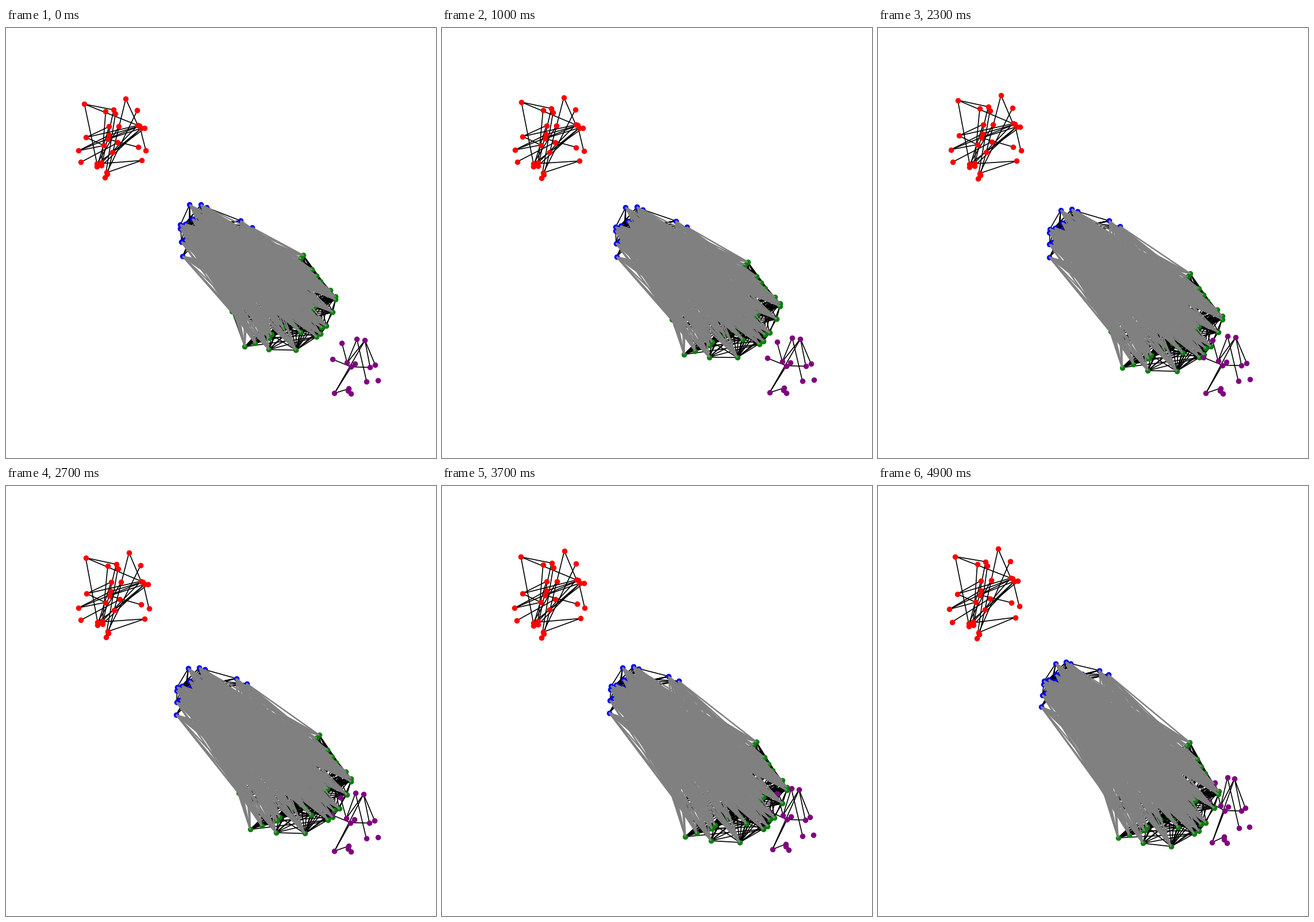
A matplotlib script for the animation above (5 s loop, 748 px wide and 748 px high).

```python
import numpy as np
import matplotlib.pyplot as plt
from itertools import combinations, pairwise, product
from matplotlib.animation import FuncAnimation
from matplotlib.collections import LineCollection

SIZE, DPI, FRAMES, INTERVAL = 748, 100, 50, 100
MID, END = 2.3, 4.9
rng = np.random.default_rng(11)


class Cluster:
    """Nodes carried by one affine drift, fitted to a few anchor nodes.

    anchors maps a node to its x, y at MID and at END; inner adds random
    nodes inside the rim; sway is the size of the shared vertical swing.
    """

    def __init__(self, color, nodes, anchors, sway=0.0, inner=0):
        start = np.array(nodes, float)
        keys = start[list(anchors)]
        shift = np.array(list(anchors.values())) - np.tile(keys, 2)
        if inner:
            mix = rng.dirichlet(np.full(len(start), 0.35), inner)
            start = np.vstack([start, mix @ start])
        fit = np.linalg.lstsq(self.basis(keys), shift, rcond=None)[0]
        drift = self.basis(start) @ fit
        self.color, self.start, self.sway = color, start, sway
        self.mid, self.end = start + drift[:, :2], start + drift[:, 2:]

    @staticmethod
    def basis(points):
        return np.column_stack([np.ones(len(points)), points])

    def __len__(self):
        return len(self.start)

    def at(self, t):
        path = (self.start * (t - MID) * (t - END) / (MID * END)
                + self.mid * t * (t - END) / (MID * (MID - END))
                + self.end * t * (t - MID) / (END * (END - MID)))
        return path - [0, self.sway * t * (t - MID) * (t - END)]


def sample(pairs, chance):
    return [p for p in pairs if rng.random() < chance]


red = Cluster(
    "red",
    [(136, 132), (208, 123), (187, 142), (173, 145), (190, 149), (228, 143),
     (179, 171), (196, 171), (229, 169), (232, 170), (235, 174), (241, 174),
     (139, 190), (179, 186), (177, 193), (194, 199), (170, 204), (126, 213),
     (185, 216), (230, 207), (243, 213), (130, 233), (236, 230), (158, 236),
     (166, 234), (158, 241), (166, 239), (175, 251), (176, 254), (172, 260)],
    {0: (138, 125, 133, 124), 11: (248, 171, 243, 164), 17: (126, 212, 126, 211),
     22: (239, 232, 239, 228), 29: (174, 261, 170, 267)})

blue = Cluster(
    "blue",
    [(319, 307), (339, 307), (349, 312), (408, 335), (428, 347), (324, 332),
     (303, 342), (303, 349), (305, 372), (307, 397), (316, 346), (311, 368)],
    {0: (318, 311, 310, 299), 3: (402, 336, 384, 322),
     6: (298, 357, 287, 352), 9: (298, 395, 284, 378)},
    sway=0.25, inner=20)

green = Cluster(
    "green",
    [(517, 395), (513, 400), (532, 420), (540, 431), (547, 441), (564, 456),
     (573, 467), (573, 472), (568, 494), (557, 518), (549, 521), (547, 532),
     (540, 537), (512, 529), (504, 560), (457, 559), (457, 539), (433, 548),
     (415, 554), (400, 503), (393, 493)],
    {0: (545, 423, 548, 442), 8: (589, 532, 577, 562), 14: (520, 597, 513, 629),
     18: (427, 584, 423, 603), 20: (401, 534, 393, 550)},
    sway=0.85, inner=22)

purple = Cluster(
    "purple",
    [(584, 548), (610, 541), (624, 543), (568, 576), (593, 582), (607, 584),
     (600, 589), (633, 590), (642, 586), (627, 615), (647, 613), (571, 635),
     (596, 627), (595, 631), (600, 636)],
    {0: (583, 544, 590, 516), 2: (621, 537, 616, 509), 3: (565, 572, 572, 548),
     10: (647, 611, 647, 592), 11: (570, 635, 580, 620)},
    sway=0.5)

clusters = [red, blue, green, purple]

# Top red nodes reach the bottom knot, left ones the knot on the right.
red_edges = [(i, 23 + 5 * i % 7) for i in range(8)]
red_edges += [(i, 8 + i % 4) for i in (12, 13, 14, 17, 18, 23, 24, 26)]
red_edges += [*pairwise((2, 0, 8, 1)), *pairwise((6, 12, 16, 17, 13)),
              *pairwise((23, 22, 27)), (9, 20), (14, 19), (15, 21)]
purple_edges = [*pairwise((0, 4, 1, 9)), *pairwise((3, 6, 7, 2, 4)),
                *pairwise((8, 2, 11, 6)), (11, 12)]
edges = [np.array(e) for e in (
    red_edges,
    sample(combinations(range(len(blue)), 2), 0.2),
    sample(combinations(range(len(green)), 2), 0.25),
    purple_edges)]


def inside_waist(pair):
    """True if the bridge passes on the inner side of the left green corner."""
    origin = blue.start[pair[0]]
    corner, tip = green.start[20] - origin, green.start[pair[1]] - origin
    return corner[0] * tip[1] - corner[1] * tip[0] < 200


all_bridges = product(range(len(blue)), range(len(green)))
bridges = np.array(sample(filter(inside_waist, all_bridges), 0.5))

fig = plt.figure(figsize=(SIZE / DPI, SIZE / DPI), dpi=DPI, facecolor="white")
ax = fig.add_axes([0, 0, 1, 1])
ax.set(xlim=(0, SIZE), ylim=(SIZE, 0))
ax.axis("off")

black_lines = LineCollection([], colors="black", linewidths=1.2, zorder=1)
gray_lines = LineCollection([], colors="gray", linewidths=1.8, zorder=3)
ax.add_collection(black_lines)
ax.add_collection(gray_lines)
dots = [ax.scatter([], [], s=47, c=c.color, linewidths=0, zorder=2) for c in clusters]


def draw(frame):
    points = [c.at(frame * INTERVAL / 1000) + 0.4 for c in clusters]
    for dot, pos in zip(dots, points):
        dot.set_offsets(pos)
    black_lines.set_segments(
        np.concatenate([pos[e] for pos, e in zip(points, edges)]))
    gray_lines.set_segments(
        np.stack([points[1][bridges[:, 0]], points[2][bridges[:, 1]]], axis=1))
    return [black_lines, *dots, gray_lines]


anim = FuncAnimation(fig, draw, frames=FRAMES, interval=INTERVAL,
                     repeat=True, repeat_delay=0)
plt.show()
```
